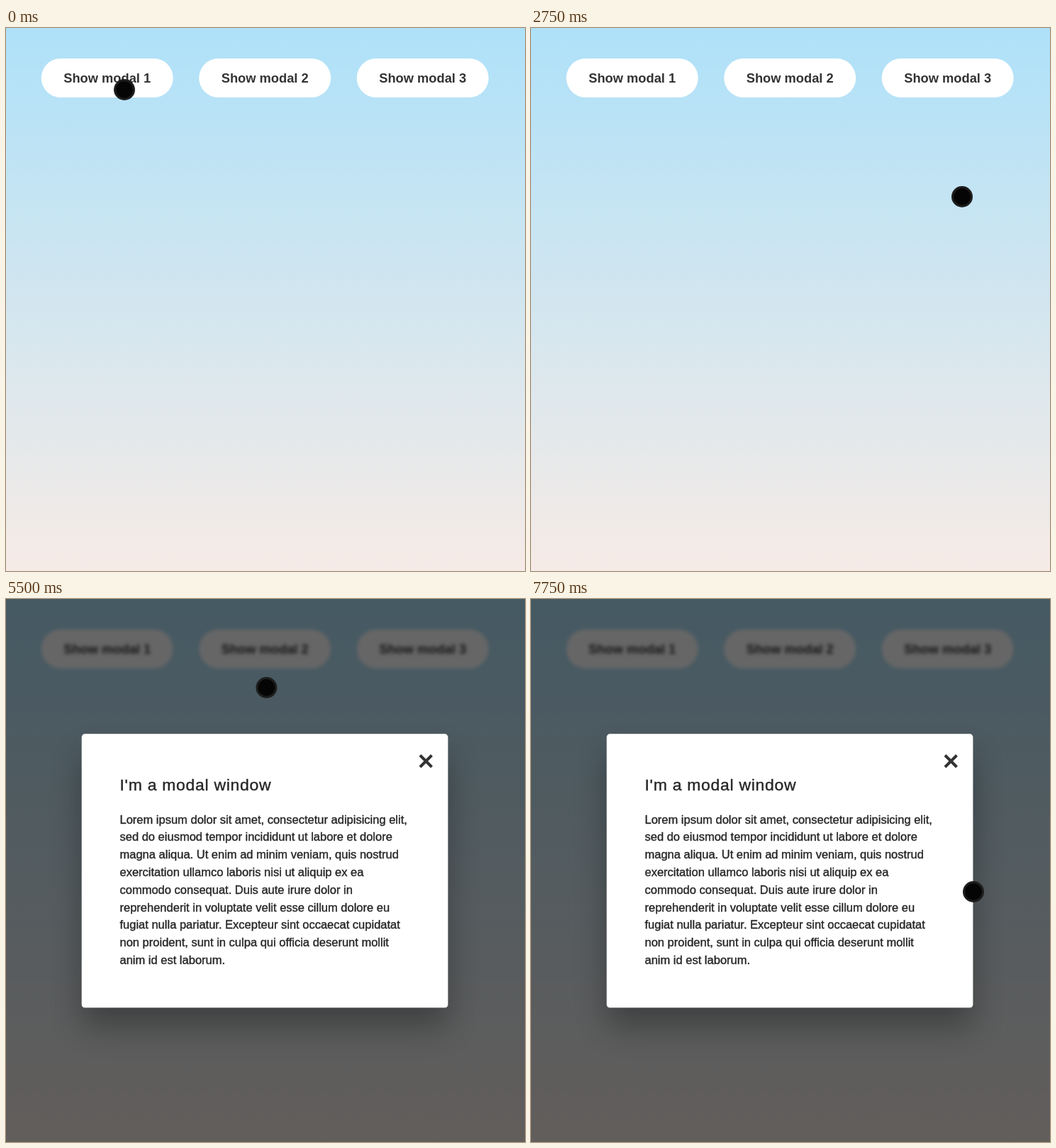
These frames come from a looping animation (732 px wide and 766 px high, 8000 ms). An HTML page:

```html
<!DOCTYPE html>
<html lang="en">
<head>
<meta charset="utf-8">
<title>Modal windows</title>
<style>
  html, body { margin: 0; width: 100%; height: 100%; overflow: hidden; }
  svg { display: block; width: 732px; height: 766px; font-family: "Liberation Sans", Arial, sans-serif; }
  #buttons rect { fill: #fff; }
  #buttons text { font-size: 18.3px; font-weight: bold; text-anchor: middle; fill: #333; }
  #buttons.blurred { filter: blur(2.5px); }
  #modal text { fill: #262626; stroke: #262626; stroke-width: .4px; }
  #modal .title { font-size: 22.9px; letter-spacing: .75px; }
  #body { font-size: 16.5px; }
  #shadow { filter: blur(22.9px); opacity: .3; }
</style>
</head>
<body>
<svg viewBox="0 0 732 766">
  <defs>
    <linearGradient id="sky" x2="0" y2="1">
      <stop stop-color="#aee1f9"/>
      <stop offset="1" stop-color="#f6ebe6"/>
    </linearGradient>
  </defs>
  <rect width="732" height="766" fill="url(#sky)"/>
  <g id="buttons"></g>
  <g id="modal">
    <rect width="732" height="766" opacity=".6"/>
    <rect id="shadow" x="107" y="218" width="516.5" height="386" rx="5"/>
    <rect x="106.7" y="190.3" width="516.7" height="386.2" rx="4.6" fill="#fff"/>
    <path d="M584 220.5l16.5 16.5m0-16.5l-16.5 16.5" stroke="#333" stroke-width="4"/>
    <text class="title" x="160.5" y="270">I'm a modal window</text>
    <g id="body"></g>
  </g>
  <rect id="tap" y="43" width="186" height="55" fill="#33b5e5" opacity=".4"/>
  <g id="cursor">
    <circle r="15" fill="#1d1d1d"/>
    <circle r="11.8" fill="#050505"/>
  </g>
</svg>
<script>
const LOOP = 8000, STEP = 250;
const find = id => document.getElementById(id);
const buttonX = i => 49.7 + 222.5 * i;

const lines = [
  'Lorem ipsum dolor sit amet, consectetur adipisicing elit,',
  'sed do eiusmod tempor incididunt ut labore et dolore',
  'magna aliqua. Ut enim ad minim veniam, quis nostrud',
  'exercitation ullamco laboris nisi ut aliquip ex ea',
  'commodo consequat. Duis aute irure dolor in',
  'reprehenderit in voluptate velit esse cillum dolore eu',
  'fugiat nulla pariatur. Excepteur sint occaecat cupidatat',
  'non proident, sunt in culpa qui officia deserunt mollit',
  'anim id est laborum.'
];
find('body').innerHTML = lines.map((line, i) =>
  `<text x="160.5" y="${316.5 + 24.8 * i}">${line}</text>`).join('');

find('buttons').innerHTML = [0, 1, 2].map(i =>
  `<rect x="${buttonX(i)}" y="43" width="186" height="55" rx="27.5"/>
   <text x="${buttonX(i) + 93}" y="77">Show modal ${i + 1}</text>`).join('');

// One visit per button, in order
const visits = [
  { open: 750, close: 2750 },
  { open: 4250, close: 5750 },
  { open: 7500, close: LOOP }
];

// The cursor eases from each stop to the next
const stops = [
  { at: 0, x: 167, y: 87 },
  { at: 750, x: 205, y: 101 },
  { at: 1250, x: 230, y: 183 },
  { at: 2000, x: 648, y: 295 },
  { at: 2250, x: 608, y: 238 },
  { at: 2750, x: 608, y: 238 },
  { at: 4500, x: 319, y: 99 },
  { at: 5750, x: 373, y: 128 },
  { at: 6000, x: 373, y: 128 },
  { at: 6250, x: 328, y: 132 },
  { at: 7250, x: 622, y: 86 },
  { at: 7750, x: 624, y: 413 }
];
const mix = (a, b, k) => a + (b - a) * k;
const ease = k => k * k * (3 - 2 * k);

function cursorAt(t) {
  const i = stops.findLastIndex(stop => stop.at <= t);
  const from = stops[i], to = stops[i + 1];
  if (!to) return [from.x, from.y];
  const k = ease((t - from.at) / (to.at - from.at));
  return [mix(from.x, to.x, k), mix(from.y, to.y, k)];
}

function show(element, visible) {
  element.style.display = visible ? '' : 'none';
}

const start = performance.now();
function draw(now) {
  // The screen refreshes four times a second
  const t = Math.floor(Math.max(0, now - start) % LOOP / STEP) * STEP;
  const current = visits.findIndex(v => t >= v.open && t < v.close);
  const open = current >= 0;
  show(find('modal'), open);
  find('buttons').classList.toggle('blurred', open);
  // A tapped button flashes for one refresh
  show(find('tap'), open && t < visits[current].open + STEP);
  find('tap').setAttribute('x', buttonX(Math.max(0, current)));
  find('cursor').setAttribute('transform', `translate(${cursorAt(t)})`);
  requestAnimationFrame(draw);
}
draw(start);
</script>
</body>
</html>
```
